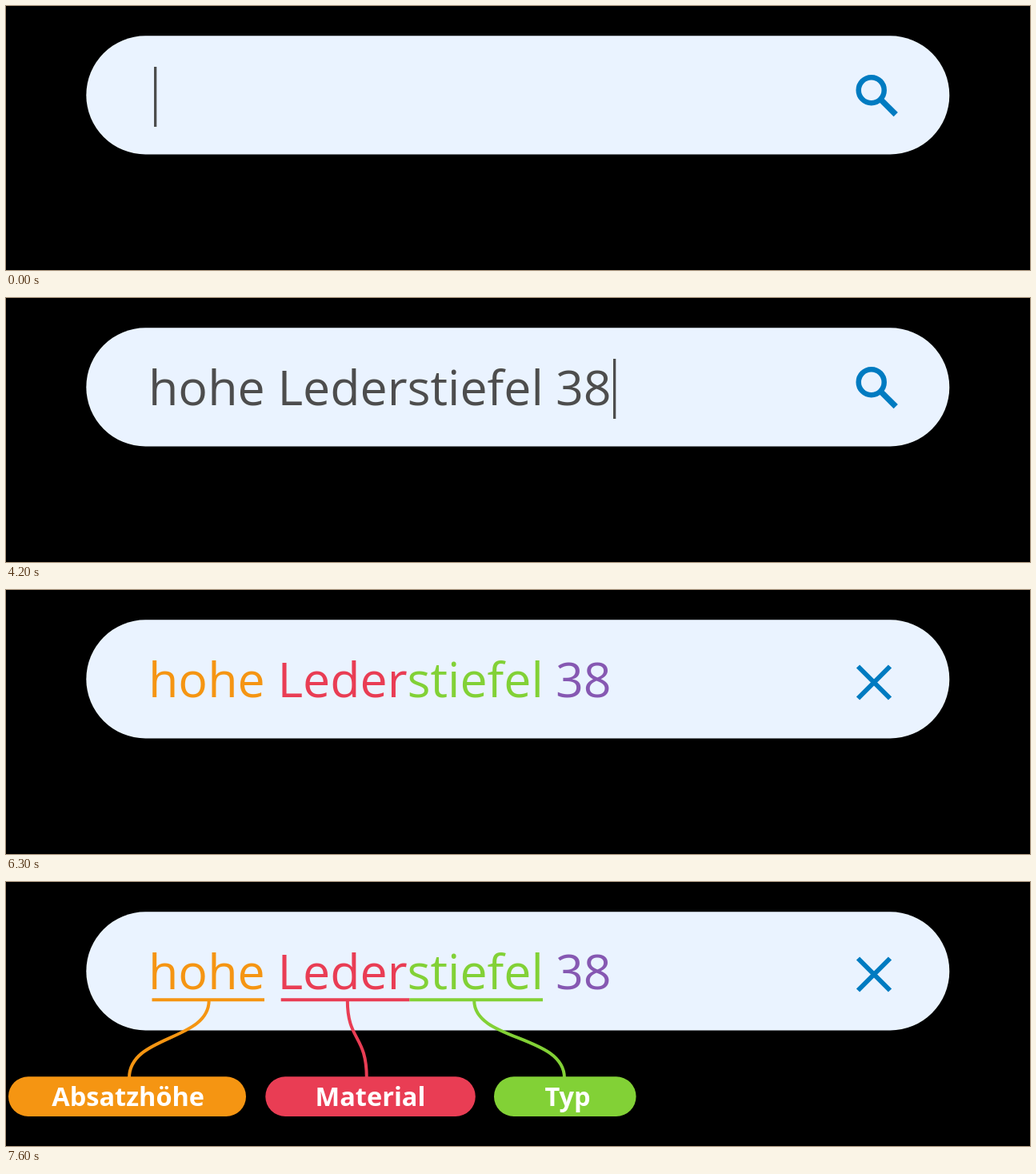
These frames come from a looping animation (1280x330 px, 8000 ms). An HTML page:

```html
<!DOCTYPE html>
<html lang="de">
<head>
<meta charset="utf-8">
<title>Suche</title>
<style>
  html, body { margin: 0; width: 100%; height: 100%; overflow: hidden; background: #000; }
  svg { display: block; width: 1280px; height: 330px; }

  svg {
    --ink: #4d4d4d; --blue: #007bc1;
    --orange: #f59512; --red: #e93d54; --green: #82d136; --purple: #8658b2;
  }
  .query { font: 60.9px "Open Sans", sans-serif; }
  .tag text { font: bold 32.5px "Open Sans", sans-serif; fill: #fff; text-anchor: middle; }
  .tag { fill: var(--c); }
  .tag path { fill: none; stroke: var(--c); stroke-width: 4; }
  .icon { fill: none; stroke: var(--blue); }

  /* every change is a hard cut on one 8 s clock */
  .cut {
    animation-duration: 8s;
    animation-timing-function: step-end;
    animation-iteration-count: infinite;
  }

  .hohe { animation-name: hohe; }
  .leder { animation-name: leder; }
  .stiefel { animation-name: stiefel; }
  .size { animation-name: size; }
  .caret { fill: var(--ink); animation-name: blink, move; }
  .lens { animation-name: lens; }
  .cross { animation-name: cross; }
  .tag1 { --c: var(--orange); animation-name: tag1; }
  .tag2 { --c: var(--red); animation-name: tag2; }
  .tag3 { --c: var(--green); animation-name: tag3; }

  @keyframes hohe {
    0% { fill: transparent; } 40% { fill: var(--ink); } 75%, 100% { fill: var(--orange); }
  }
  @keyframes leder {
    0% { fill: transparent; } 43.75% { fill: var(--ink); } 76.25%, 100% { fill: var(--red); }
  }
  @keyframes stiefel {
    0% { fill: transparent; } 47.5% { fill: var(--ink); } 77.5%, 100% { fill: var(--green); }
  }
  @keyframes size {
    0% { fill: transparent; } 52.5% { fill: var(--ink); } 78.75%, 100% { fill: var(--purple); }
  }
  @keyframes blink {
    0%, 12.5%, 25%, 37.5%, 65% { opacity: 1; }
    6.25%, 18.75%, 31.25%, 58.75%, 71.25%, 100% { opacity: 0; }
  }
  @keyframes move {
    0% { transform: translateX(185px); }
    40% { transform: translateX(329.6px); }
    42.5% { transform: translateX(345.5px); }
    43.75% { transform: translateX(506.8px); }
    47.5% { transform: translateX(674px); }
    51.25% { transform: translateX(690px); }
    52.5%, 100% { transform: translateX(759px); }
  }
  @keyframes lens {
    0% { opacity: 1; } 71.25% { opacity: .5; } 73.75%, 100% { opacity: 0; }
  }
  @keyframes cross { 0% { opacity: 0; } 73.75%, 100% { opacity: 1; } }
  @keyframes tag1 { 0% { opacity: 0; } 82.5%, 100% { opacity: 1; } }
  @keyframes tag2 { 0% { opacity: 0; } 88.75%, 100% { opacity: 1; } }
  @keyframes tag3 { 0% { opacity: 0; } 95%, 100% { opacity: 1; } }
</style>
</head>
<body>
<svg viewBox="0 0 1280 330">
  <rect x="100.3" y="37.3" width="1079" height="148.2" rx="74.1" fill="#eaf3ff"/>

  <g class="query">
    <text class="cut hohe" x="178" y="134">hohe</text>
    <text class="cut leder" x="339.5" y="134">Leder</text>
    <text class="cut stiefel" x="501.5" y="134">stiefel</text>
    <text class="cut size" x="687" y="134">38</text>
  </g>
  <rect class="cut caret" y="76" width="3.3" height="75"/>

  <g class="cut icon lens">
    <circle cx="1081.7" cy="105.2" r="16" stroke-width="6.5"/>
    <path d="M1092 115.5 L1112.2 135.7" stroke-width="7.4"/>
  </g>
  <path class="cut icon cross" d="M1065 95.5 l40 40 m0 -40 l-40 40" stroke-width="6"/>

  <g class="cut tag tag1">
    <path d="M182.5 147.3 H323 M253.7 148 C253.7 199 154 191 154 245"/>
    <rect x="3" y="243.3" width="297" height="49.7" rx="24.8"/>
    <text x="152.7" y="280">Absatzhöhe</text>
  </g>
  <g class="cut tag tag2">
    <path d="M343.7 147.3 H504.5 M426.8 148 C426.8 199 450.8 191 450.8 245"/>
    <rect x="324.3" y="243.3" width="262.5" height="49.7" rx="24.8"/>
    <text x="455.5" y="280">Material</text>
  </g>
  <g class="cut tag tag3">
    <path d="M504.5 147.3 H671 M585.2 148 C585.2 199 698 191 698 245"/>
    <rect x="610" y="243.3" width="177.6" height="49.7" rx="24.8"/>
    <text x="702" y="280">Typ</text>
  </g>
</svg>
</body>
</html>
```
